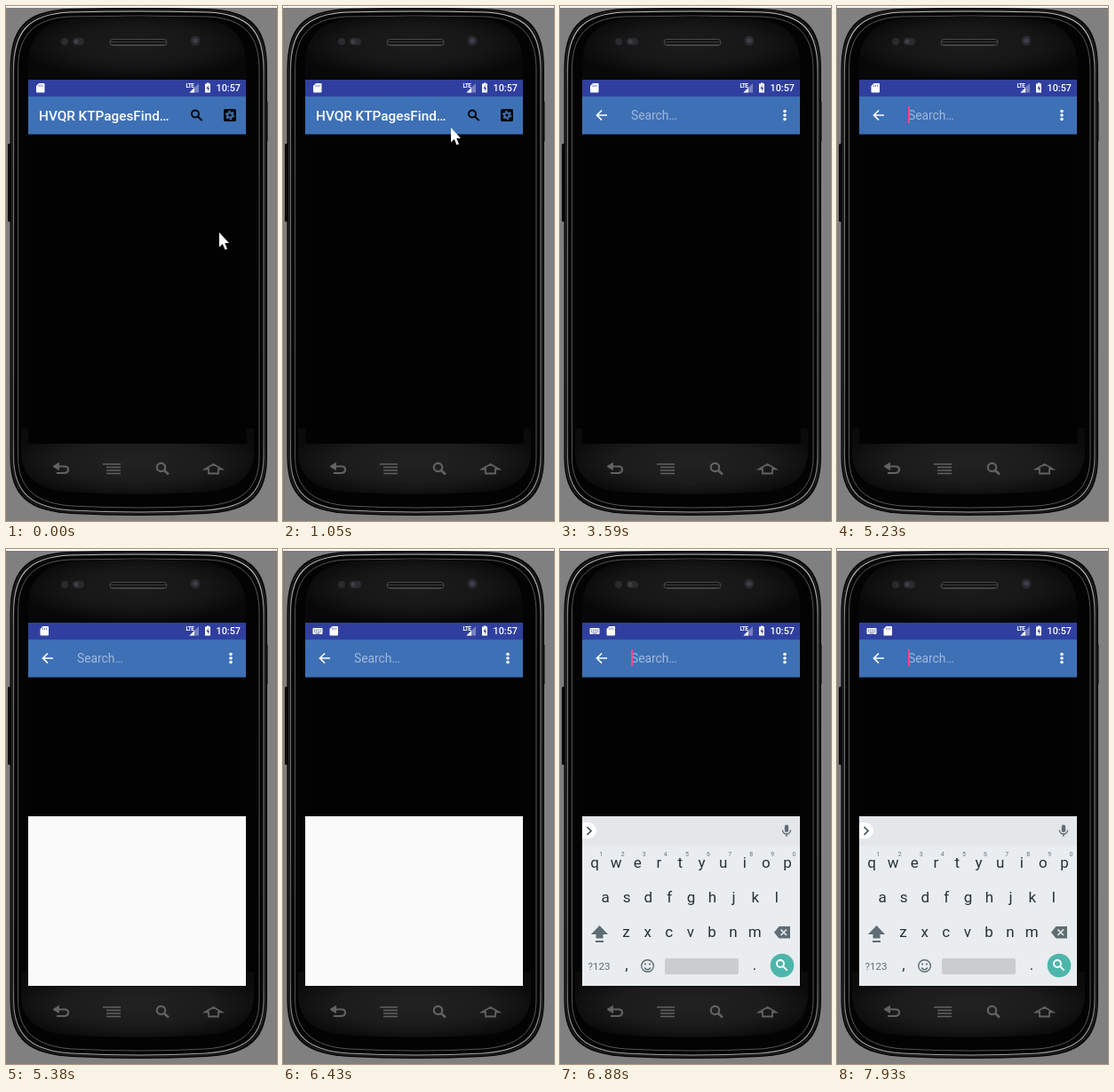
Write an HTML page that moves like this. It is 305x580 px and loops after 8000 ms.

```html
<!DOCTYPE html>
<html lang="en">
<head>
<meta charset="utf-8">
<title>Phone search</title>
<style>
  html, body { margin: 0; width: 100%; height: 100%; overflow: hidden; background: #808080; }
  svg { display: block; width: 305px; height: 580px; font-family: Roboto, sans-serif; }
  .line { fill: none; stroke-linecap: butt; }
  .mid { text-anchor: middle; }
</style>
</head>
<body>
<svg viewBox="0 0 305 580">
  <defs>
    <radialGradient id="top" cx=".5" cy=".45" r=".55">
      <stop offset="0" stop-color="#1c1c1c"/><stop offset=".6" stop-color="#161616"/><stop offset="1" stop-color="#080808"/>
    </radialGradient>
    <radialGradient id="base" cx=".5" cy=".5" r=".55">
      <stop offset="0" stop-color="#222"/><stop offset=".6" stop-color="#1b1b1b"/><stop offset="1" stop-color="#0b0b0b"/>
    </radialGradient>
    <linearGradient id="rim" x2="0" y2="1">
      <stop offset="0" stop-color="#c8c8c8"/><stop offset=".15" stop-color="#777"/>
      <stop offset=".85" stop-color="#666"/><stop offset="1" stop-color="#aaa"/>
    </linearGradient>
    <pattern id="mesh" width="2" height="3" patternUnits="userSpaceOnUse">
      <path d="M0 0H2V3H0Z" fill="#141414"/><path d="M0 1.5H2" stroke="#3c3c3c"/>
    </pattern>
    <clipPath id="screenClip"><path d="M25 83H270V492H25Z"/></clipPath>
    <g id="lens" class="line"><circle cx="-1.5" cy="-1.5" r="4"/><path d="M1.5 1.5L6.2 6.2"/></g>
  </defs>

  <path d="M0 0H305V2H0Z" fill="#fff"/>
  <rect x="2" y="155" width="5" height="88" rx="1.5" fill="#0b0b0b"/>
  <rect x="290" y="107" width="4.5" height="46" rx="1.5" fill="#0b0b0b"/>
  <g id="shell"></g>

  <path d="M25 83V62C27 34 42 17 76 14Q148 9 220 14C253 17 268 34 270 62V83Z" fill="url(#top)"/>
  <path d="M17 476H25V493H271V476H279V505C277 531 260 544 228 547Q148 553 68 547C36 544 19 531 17 505Z" fill="url(#base)"/>
  <g fill="#2b2b2f">
    <circle cx="66" cy="40" r="4"/><rect x="75" y="36" width="13" height="8" rx="4"/>
    <circle cx="213" cy="39" r="5.5"/><circle cx="213" cy="39" r="2.5" fill="#3d4250"/>
    <circle cx="79" cy="40" r="2.5" fill="#3f3f45"/>
  </g>
  <rect x="117" y="37.5" width="64" height="7" rx="3.5" fill="url(#mesh)" stroke="#484848"/>

  <g class="line" stroke="#626262" stroke-width="2.2">
    <path d="M57 518.5H66Q70 518.5 70 522T66 526H57"/>
    <path d="M53 518.5L59.500 514.500V522.500Z" fill="#626262" stroke-width="1"/>
    <path d="M109 516H129M113 519.5H129M113 523H129M113 526.5H129" stroke-width="1.6"/>
    <circle cx="174.5" cy="519.5" r="4.7"/><path d="M178 523L183 527.5" stroke-width="2.8"/>
    <path d="M224 521.5L233.5 516L243 521.5H239V526.5H228V521.5Z" stroke-width="1.8"/>
  </g>

  <g clip-path="url(#screenClip)">
    <path d="M25 83H270V492H25Z" fill="#020202"/>
    <path d="M25 83H270V102H25Z" fill="#303f9f"/>
    <path d="M25 102H270V144.600H25Z" fill="#3e70b5"/>

    <g fill="#fff">
      <g id="card"><path d="M-1.500 87H4Q5 87 5 88V96.500Q5 97.500 4 97.500H-3.500Q-4.500 97.500-4.500 96.500V90Z"/>
        <path d="M-1.500 88.500V91M.5 88.500V91M2.500 88.500V91" stroke="#303f9f" stroke-width=".6"/></g>
      <g id="keysIcon"><rect x="33.500" y="89" width="11" height="7" rx="1"/>
        <path d="M35 91H43.500M35 93H43.500" stroke="#303f9f" stroke-dasharray="1 .8"/><path d="M36.500 95H41.500" stroke="#303f9f" stroke-width=".8"/></g>
      <text x="202.500" y="91.800" font-size="6.500" font-weight="700" letter-spacing="-.6">LTE</text>
      <path d="M217 87V97.500H206.500Z" opacity=".35"/><path d="M212 92V97.500H206.500Z"/>
      <path d="M226 86.500H228.500V87.500H230V97.500H224V87.500H226Z"/>
      <path d="M227.800 89L225.500 93H227V96L229 92H227.500Z" fill="#303f9f"/>
      <text x="264" y="96.300" font-size="10.800" font-weight="500" text-anchor="end">10:57</text>
    </g>

    <g id="titleBar">
      <text x="37" y="128.500" font-size="15.300" font-weight="500" fill="#fff">HVQR KTPagesFind…</text>
      <use href="#lens" x="214.500" y="123" stroke="#050505" stroke-width="1.900"/>
      <rect x="245" y="116" width="14" height="14" rx="1.800" fill="#050505"/>
      <g class="line" stroke="#3e70b5"><circle cx="252" cy="123" r="2.800" stroke-width="2"/>
        <circle cx="252" cy="123" r="4.400" stroke-width="1.700" stroke-dasharray="2.300 2.308"/></g>
    </g>
    <g id="searchBar">
      <path class="line" d="M53 123H42M47 117.500L41.500 123L47 128.500" stroke="#fff" stroke-width="1.700"/>
      <text x="80" y="128" font-size="13.800" fill="#a0b8da">Search…</text>
      <g fill="#fff"><circle cx="253" cy="118.500" r="1.800"/><circle cx="253" cy="123" r="1.800"/><circle cx="253" cy="127.500" r="1.800"/></g>
    </g>
    <path id="caret" d="M80 113H82V132H80Z" fill="#ff4081"/>

    <path id="panel" d="M25 301H270V492H25Z" fill="#fafafa"/>
    <g id="keyboard">
      <path d="M25 301H270V492H25Z" fill="#e9edef"/>
      <path d="M25 301H270V334.500H25Z" fill="#e4e7e9"/>
      <path d="M25 308H32A9 9 0 0 1 32 326H25Z" fill="#fff"/>
      <path class="line" d="M30.500 313L35 317.500L30.500 322" stroke="#37474f" stroke-width="1.600"/>
      <g class="line" stroke="#5f6d75" stroke-width="1.400">
        <rect x="252.800" y="310.500" width="4.400" height="8.500" rx="2.200" fill="#5f6d75" stroke="none"/>
        <path d="M250.500 316.500A4.500 4.500 0 0 0 259.500 316.500M255 321V324"/>
        <circle cx="98.500" cy="469.500" r="6.800"/><path d="M95 471.500Q98.500 476 102 471.500"/>
      </g>
      <g fill="#5f6d75">
        <path d="M44.500 424L54 434H48.500V438.500H40.500V434H35Z"/><path d="M40 441H49V443H40Z"/>
        <path d="M246.500 425H259V438.500H246.500L241 431.700Z"/>
        <circle cx="96" cy="467.500" r="1.100"/><circle cx="101" cy="467.500" r="1.100"/>
        <text class="mid" x="44" y="474" font-size="11.500">?123</text>
      </g>
      <path class="line" d="M248.500 428.500L255 435M255 428.500L248.500 435" stroke="#e9edef" stroke-width="1.600"/>
      <rect x="118" y="461" width="83" height="18" rx="2" fill="#c9cdd0"/>
      <circle cx="250" cy="469" r="13.300" fill="#4db6ac"/>
      <use href="#lens" x="249.500" y="468.500" stroke="#fff" stroke-width="1.900"/>
      <g id="letters" class="mid" fill="#263238" font-size="17"></g>
    </g>
  </g>

  <path id="pointer" d="M0 0V16.500L3.800 13L6.500 19.500L9 18.500L6.300 12H11Z" fill="#fff"/>
</svg>

<script>
const LOOP = 8000;
const el = id => document.getElementById(id);

function add(parent, tag, attrs, text = '') {
  const node = document.createElementNS('http://www.w3.org/2000/svg', tag);
  for (const key in attrs) node.setAttribute(key, attrs[key]);
  node.textContent = text;
  parent.append(node);
}

// Phone outline, shrunk by an inset on every side.
function outline(inset) {
  const l = 4.5 + inset, r = 294 - inset, t = 3 + inset, b = 574 - inset;
  return `M${l} 72C${l} ${26 + inset} ${20 + inset} ${t + 2} 72 ${t}Q150 ${t - 2} 227 ${t}` +
    `C${279 - inset} ${t + 2} ${r} ${26 + inset} ${r} 72V507` +
    `C${r} ${553 - inset} ${274 - inset} ${b - 5} 225 ${b - 2}Q150 ${b + 2} 74 ${b - 2}` +
    `C${25 + inset} ${b - 5} ${l} ${553 - inset} ${l} 507Z`;
}

[[0, '#060606', 'none', 0], [2, '#0c0c0c', '#2a2a2a', 1], [4, '#050505', 'url(#rim)', 1.2],
 [9, '#030303', '#555', 1]]
  .forEach(([inset, fill, stroke, width]) =>
    add(el('shell'), 'path', { d: outline(inset), fill, stroke, 'stroke-width': width }));

[['qwertyuiop', 39, 359], ['asdfghjkl', 51, 398], ['zxcvbnm', 74.5, 437]].forEach(([row, x, y]) =>
  [...row].forEach((key, i) => {
    add(el('letters'), 'text', { x: x + i * 24.1, y }, key);
    if (row.length === 10)
      add(el('letters'), 'text', { x: x + 7.5 + i * 24.1, y: 346, 'font-size': 7, fill: '#66757d' }, (i + 1) % 10);
  }));
add(el('letters'), 'text', { x: 75, y: 474 }, ',');
add(el('letters'), 'text', { x: 219, y: 474 }, '.');

// Each table holds [start in ms, value...]; values hold until the next row.
const pointerSteps = [[0, 240, 255], [150, 237, 268], [300, 229, 284], [450, 220, 292], [600, 208, 270],
  [750, 197, 225], [900, 191, 173], [1050, 189, 137], [1200, 194, 130], [1350, 202, 125],
  [1500, 207, 123], [1790, 208, 123], [1940, 210, 123], [2090, null]];
const caretSteps = [[0, 0], [3880, 1], [4330, 0], [4780, 1], [5380, 0], [5830, 1],
  [6430, 0], [6880, 1], [7330, 0], [7930, 1]];
const cardSteps = [[0, 38.5], [5080, 41], [5230, 43], [5680, 50], [5830, 57]];
const keyboardSteps = [[0, 0, 39], [6730, .55, 39], [6880, 1, 0]];

const at = (steps, time) => steps.findLast(step => step[0] <= time).slice(1);
const show = (id, on) => el(id).setAttribute('visibility', on ? 'visible' : 'hidden');
const move = (id, x, y) => el(id).setAttribute('transform', `translate(${x} ${y})`);

function draw(now) {
  const time = now % LOOP;
  const [px, py] = at(pointerSteps, time);
  const [opacity, drop] = at(keyboardSteps, time);
  show('pointer', px !== null);
  if (px !== null) move('pointer', px, py);
  show('titleBar', time < 3590);
  show('searchBar', time >= 3590);
  show('caret', at(caretSteps, time)[0]);
  move('card', at(cardSteps, time)[0], 0);
  show('keysIcon', time >= 5830);
  show('panel', time >= 5380);
  move('keyboard', 0, drop);
  el('keyboard').setAttribute('opacity', opacity);
}

const start = performance.now();
function tick() {
  draw(performance.now() - start);
  requestAnimationFrame(tick);
}
tick();
</script>
</body>
</html>
```
